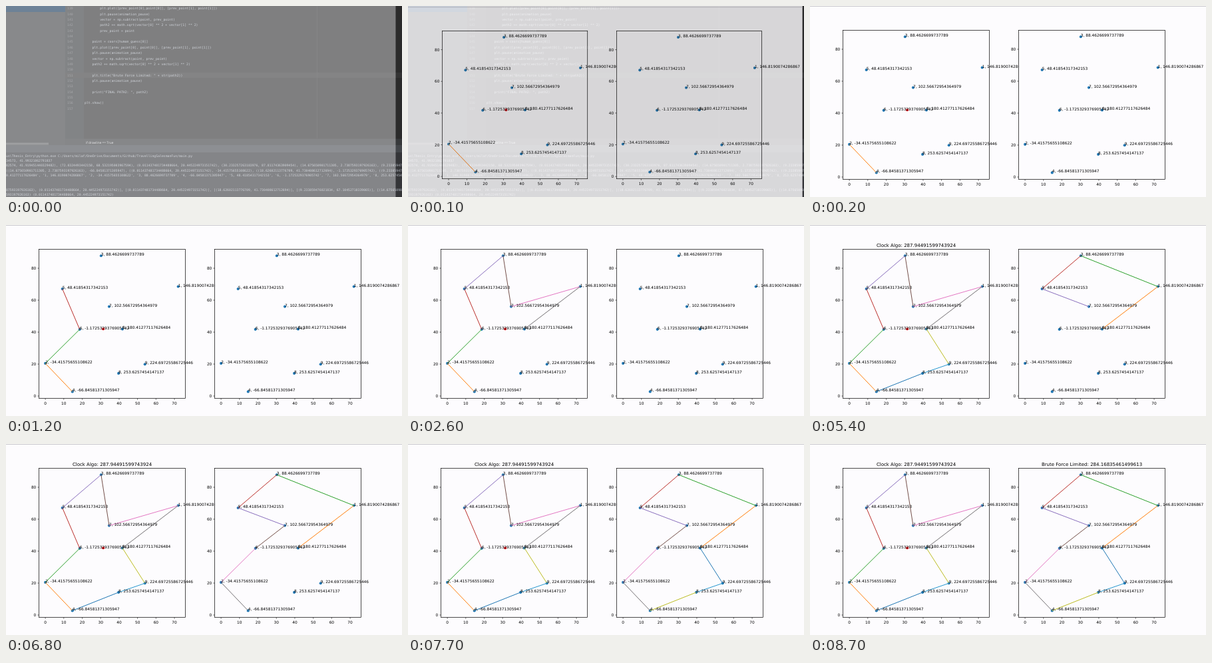
Write an HTML page that moves like this. It is 595x287 px and loops after 8.8 s.

```html
<!DOCTYPE html>
<html lang="en">
<head>
<meta charset="utf-8">
<title>Tour plots</title>
<style>
html, body { margin: 0; width: 100%; height: 100%; overflow: hidden; background: #fdfcfe; }
svg { display: block; width: 595px; height: 287px; }
text { white-space: pre; text-rendering: geometricPrecision; }
.code { font: 4.81px "DejaVu Sans Mono", monospace; fill: #b4bac2; }
.num { fill: #6c6f72; }
.ui { font: 4.8px "Open Sans", sans-serif; fill: #dcdcdc; }
.plot { font: 5.83px "DejaVu Sans", sans-serif; fill: #000; }
.title { font-size: 7px; text-anchor: middle; }
.mid { text-anchor: middle; }
.end { text-anchor: end; }
</style>
</head>
<body>
<svg id="stage" viewBox="0 0 595 287" xmlns="http://www.w3.org/2000/svg"></svg>
<script>
const LOOP = 8800, STEP = 400;
const NS = "http://www.w3.org/2000/svg";
const stage = document.getElementById("stage");

function add(parent, tag, attrs, content) {
  const el = document.createElementNS(NS, tag);
  for (const key in attrs) el.setAttribute(key, attrs[key]);
  if (content !== undefined) el.textContent = content;
  parent.appendChild(el);
  return el;
}
const rect = (g, x, y, width, height, fill) => add(g, "rect", { x, y, width, height, fill });
const line = (g, x1, y1, x2, y2, stroke, width) =>
  add(g, "line", { x1, y1, x2, y2, stroke, "stroke-width": width });
const text = (g, x, y, cls, str) => add(g, "text", { x, y, class: cls }, str);

// Points: x, y and the angle shown in the label
const points = [
  [41.8, 41.92, "180.41277117626484"],
  [72.03, 68.53, "146.8190074286867"],
  [0.01, 20.45, "-34.41575655108622"],
  [30.23, 87.81, "88.4626699737789"],
  [14.68, 2.74, "-66.84581371305947"],
  [9.23, 67.1, "48.41854317342153"],
  [18.63, 41.73, "-1.1725329376905742"],
  [34.6, 56, "102.56672954364979"],
  [39.7, 14.2, "253.6257454147137"],
  [54, 19.9, "224.69725586725446"]
];
const labels = points.map((p, i) => i + ", " + p[2]);
const colors = ["#ff7f0e", "#2ca02c", "#bb2f2b", "#8a6fbd", "#74504a",
                "#e377c2", "#747074", "#bcbd22", "#2496cf", "#1f77b4"];

function drawEditor(g) {
  rect(g, 0, 0, 595, 287, "#2b2b2b");
  rect(g, 0, 0, 89, 209, "#3a3c3e");
  rect(g, 0, 0, 89, 9, "#0d3152");
  rect(g, 0, 205.5, 64, 3, "#5e6062");
  rect(g, 89, 0, 28, 209, "#313335");
  rect(g, 89, 100, 506, 8, "#343434");
  rect(g, 467, 0, 0.7, 199, "#3c3c3c");
  rect(g, 89, 199.5, 506, 9.5, "#37393b");
  rect(g, 0, 209, 595, 11, "#43464a");
  rect(g, 0, 220, 595, 67, "#343538");

  const path2 = "path2 += math.sqrt(vector[0] ** 2 + vector[1] ** 2)";
  const pause = "plt.pause(animation_pause)";
  const vector = "vector = np.subtract(point, prev_point)";
  // Indent level and code, from line 139 on
  const code = [
    [2, "plt.plot([prev_point[0],point[0]], [prev_point[1], point[1]])"],
    [2, pause], [2, vector], [2, path2], [2, "prev_point = point"], [0, ""],
    [1, "point = coors[human_guess[0]]"],
    [1, "plt.plot([prev_point[0], point[0]], [prev_point[1], point[1]])"],
    [1, pause], [1, vector], [1, path2], [0, ""],
    [1, 'plt.title("Brute Force Limited: " + str(path2))'],
    [1, pause], [0, ""],
    [1, 'print("FINAL PATH2: ", path2)'], [0, ""],
    [0, "plt.show()"], [0, ""]
  ];
  code.forEach(([level, str], i) => {
    const y = 5.2 + i * 8.37;
    text(g, 92, y, "code num", 139 + i);
    text(g, 118 + level * 11.58, y, "code", str);
  });
  text(g, 120, 206.8, "ui", "if drawline == True");

  const p2 = "(0.011437481734488664, 20.445224973151742)";
  const p4 = "(14.675650901711305, 2.7387593197926163)";
  const p5 = "(9.233859476021834, 67.10452718339065)";
  const p6 = "(18.62602113776709, 41.730408612712694)";
  const output = [
    "us\\Thesis_Entry\\python.exe C:/Users/milaf/OneDrive/Documents/Github/TravellingSalesmanFun/main.py",
    "34573, 41.99321862791837",
    "82574, 41.919451440329482), (72.0324493442158, 68.532195003967594), " + p2 +
      ", (30.233257263183976, 87.81174363909454), " + p4 + ", " + p5,
    `(${p4}, ${points[4][2]}), (${p2}, ${points[2][2]}), (${p6}, ${points[6][2]}), (${p5}`,
    "0.41277117626484', " + labels.slice(1).map(s => `'${s}'`).join(", "),
    "", "",
    `87593197926163), ${p2}], [${p2}], [${p6}], [${p5}], [${p4}`,
    "593197926163) " + p2
  ];
  output.forEach((str, i) => text(g, 0, 226.8 + i * 7.25, "code", str));
}

// Returns the pieces of one subplot that appear later
function drawAxes(g, left, tour, title, center) {
  const px = v => left + 9.6 + v * 2.771;
  const py = v => 257 - v * 2.4;
  const top = 36.5, bottom = 260.6, right = left + 220;
  const dot = (x, y, fill) => add(g, "circle", { cx: px(x), cy: py(y), r: 2.05, fill });

  rect(g, left, top, right - left, bottom - top, "#fdfcfe");
  points.forEach(p => dot(p[0], p[1], "#1f77b4"));
  if (center) dot(center[0], center[1], "#e8141c");

  const edges = colors.map((color, i) => {
    const a = points[tour[i]], b = points[tour[i + 1]];
    return line(g, px(a[0]), py(a[1]), px(b[0]), py(b[1]), color, 1);
  });

  for (let v = 0; v <= 70; v += 10) {
    line(g, px(v), bottom, px(v), bottom + 2.1, "#000", 0.6);
    text(g, px(v), 269.5, "plot mid", v);
  }
  for (let v = 0; v <= 80; v += 20) {
    line(g, left - 2.1, py(v), left, py(v), "#000", 0.6);
    text(g, left - 4.2, py(v) + 2.2, "plot end", v);
  }
  add(g, "rect", { x: left, y: top, width: right - left, height: bottom - top,
                   fill: "none", stroke: "#000", "stroke-width": 0.7 });
  points.forEach((p, i) => text(g, px(p[0]), py(p[1]), "plot", labels[i]));
  const heading = text(g, (left + right) / 2, 32.6, "plot title", title);
  return [...edges, heading];
}

drawEditor(add(stage, "g", {}));
const win = add(stage, "g", {});
rect(win, -30, -10, 625, 307, "#fdfcfe");
const figure = add(win, "g", {});
rect(figure, -30, 0, 625, 1, "#cbcacf");
const first = drawAxes(figure, 49.5, [4, 2, 6, 5, 3, 7, 1, 0, 9, 8, 4],
  "Clock Algo: 287.94491599743924", [31.4, 41.99]);
const second = drawAxes(figure, 313.5, [0, 1, 3, 5, 7, 6, 2, 4, 8, 9, 0],
  "Brute Force Limited: 284.16835461499613");

const show = (el, on) => el.setAttribute("visibility", on ? "visible" : "hidden");

// Opacity and scale of the window while it opens
const opening = [[0.4, 0.968], [0.82, 0.992], [1, 1]];

function render(t) {
  const [opacity, scale] = opening[Math.min(2, Math.floor(t / 100))];
  win.setAttribute("opacity", opacity);
  win.setAttribute("transform",
    `translate(297.5 146) scale(${scale}) translate(-297.5 -146)`);
  figure.setAttribute("display", t < 100 ? "none" : "inline");
  first.forEach((el, i) => show(el, t >= 100 + i * STEP));
  second.forEach((el, i) => show(el, t >= 4100 + i * STEP));
}

function tick(now) {
  render(now % LOOP);
  requestAnimationFrame(tick);
}
render(0);
requestAnimationFrame(tick);
</script>
</body>
</html>
```
